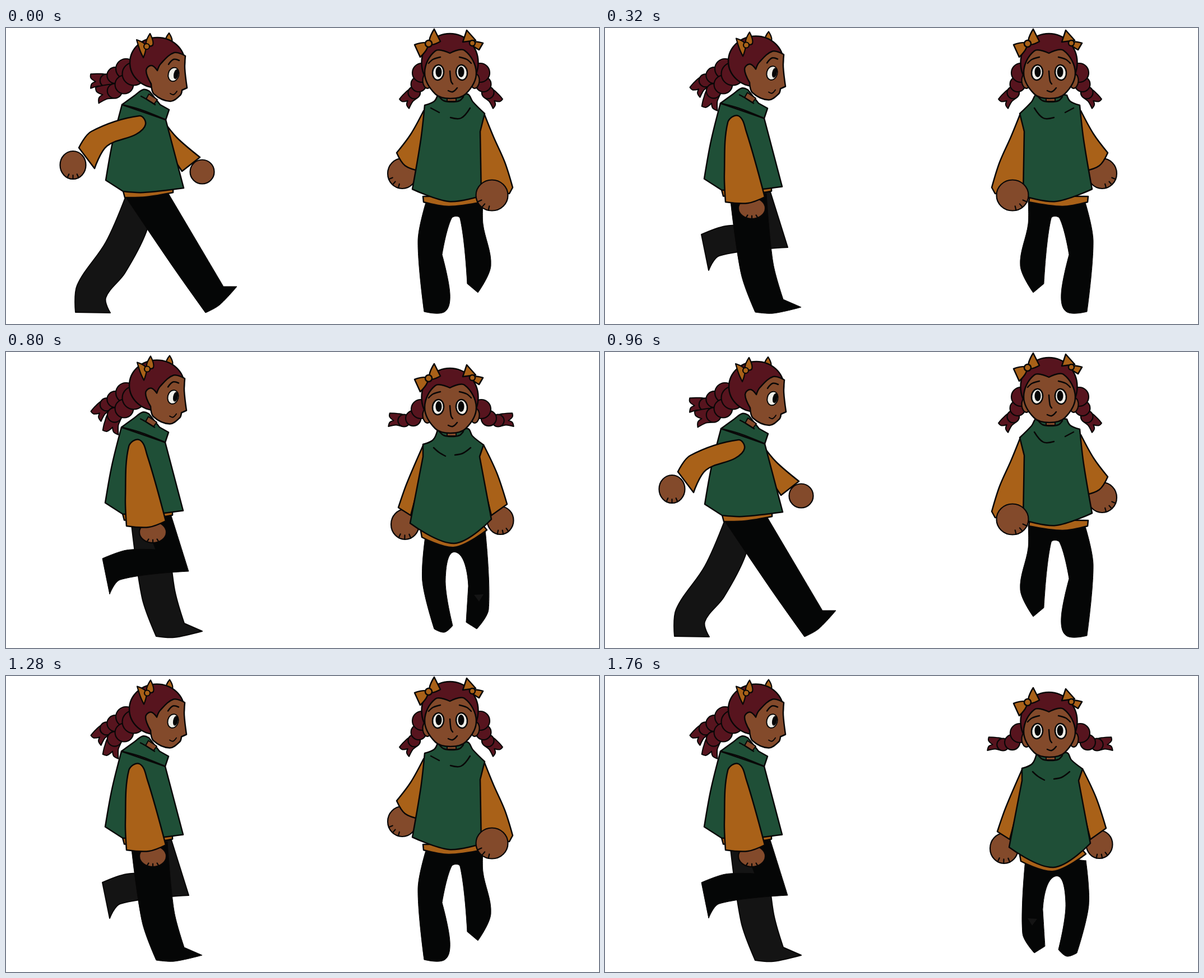
Animation, 1058 px wide and 529 px high, one loop 1.92 s. Source, as an HTML page with a canvas:

```html
<!DOCTYPE html>
<html lang="en">
<head>
<meta charset="utf-8">
<title>Walk cycle</title>
<style>
html, body { margin: 0; width: 100%; height: 100%; overflow: hidden; background: #fff; }
canvas { display: block; width: 100vw; height: 100vh; }
</style>
</head>
<body>
<canvas id="stage" width="1058" height="529"></canvas>
<script>
const ctx = document.getElementById('stage').getContext('2d');
const INK = '#080707', HAIR = '#57141e', SKIN = '#834a2b', GREEN = '#1f4f37',
      ORANGE = '#a96118', BLACK = '#050606', GREY = '#141414', EYE = '#efeee8';
const STEP = 160, STEPS = 12, DOWN = Math.PI / 2;
const cache = new Map();

// Smooth curve through "x,y" key points; a trailing "!" marks a sharp corner.
function trace(text, closed) {
  const key = text + closed;
  if (cache.has(key)) return cache.get(key);
  const pts = text.split(' ').map(s => {
    const [x, y] = s.replace('!', '').split(',').map(Number);
    return { x, y, sharp: s.endsWith('!') };
  });
  const n = pts.length;
  pts.forEach((p, i) => {
    const a = pts[(i + n - 1) % n], b = pts[(i + 1) % n];
    const still = p.sharp || (!closed && (i === 0 || i === n - 1));
    const d = still ? Infinity : Math.hypot(b.x - a.x, b.y - a.y);
    p.tx = (b.x - a.x) / d;
    p.ty = (b.y - a.y) / d;
  });
  const path = new Path2D();
  path.moveTo(pts[0].x, pts[0].y);
  for (let i = 0; i < (closed ? n : n - 1); i++) {
    const p = pts[i], q = pts[(i + 1) % n];
    const k = Math.hypot(q.x - p.x, q.y - p.y) / 3;
    path.bezierCurveTo(p.x + p.tx * k, p.y + p.ty * k, q.x - q.tx * k, q.y - q.ty * k, q.x, q.y);
  }
  if (closed) path.closePath();
  cache.set(key, path);
  return path;
}

function paint(path, fill, width = 2.5) {
  ctx.fillStyle = fill;
  ctx.fill(path);
  ctx.lineWidth = width;
  if (width) ctx.stroke(path);
}

const shape = (text, fill, width) => paint(trace(text, true), fill, width);

function line(text, width = 2.5) {
  ctx.lineWidth = width;
  ctx.stroke(trace(text, false));
}

function oval(x, y, rx, ry, fill, width, turn = 0) {
  const path = new Path2D();
  path.ellipse(x, y, rx, ry, turn, 0, Math.PI * 2);
  paint(path, fill, width);
}

function at(x, y, draw) {
  ctx.save();
  ctx.translate(x, y);
  draw();
  ctx.restore();
}

// Reflects x to sum - x when on.
function mirror(on, sum, draw) {
  ctx.save();
  if (on) ctx.transform(-1, 0, 0, 1, sum, 0);
  draw();
  ctx.restore();
}

// Round hand with three knuckle ticks fanned around an angle.
function fist(x, y, rx, ry, angle) {
  oval(x, y, rx, ry, SKIN, 2.2);
  if (angle === undefined) return;
  for (let a = angle - 0.45; a < angle + 0.5; a += 0.45) {
    const c = Math.cos(a), s = Math.sin(a);
    ctx.beginPath();
    ctx.moveTo(x + rx * c * 0.72, y + ry * s * 0.72);
    ctx.lineTo(x + rx * c, y + ry * s);
    ctx.stroke();
  }
}

// Shrinking beads along a curl, ending in a forked tuft.
function braid(x, y, r, angle, curl, tuft) {
  const beads = [];
  for (let i = 0; i < 3; i++) {
    beads.unshift([x, y, r]);
    x += Math.cos(angle) * r * 1.25;
    y += Math.sin(angle) * r * 1.25;
    angle += curl;
    r *= 0.8;
  }
  const [ex, ey, er] = beads[0];
  at(ex, ey, () => {
    ctx.rotate(tuft);
    ctx.scale(er / 10, er / 10);
    shape('0,-8 13,-8 25,-11! 23,-4 17,-1! 24,5 24,11! 12,11 0,8', HAIR, 20 / er);
  });
  beads.forEach(([bx, by, br]) => oval(bx, by, br, br, HAIR, 2.2));
}

// ---- side view ----

const legs = {
  contact: {
    back: '214,300! 178,383 127,460 124,508! 186,509! 178,482 212,438 250,365 262,305!',
    front: '212,300! 300,430 356,509! 381,495 412,462! 388,462! 290,296!'
  },
  down: {
    back: '213,318! 180,390 117,458! 162,509! 172,448 238,392 265,318!',
    front: '239,318! 300,405! 315,508! 398,509! 361,475! 346,367! 296,310!'
  },
  pass: {
    front: '223,300! 243,440 268,508! 300,510 350,499! 318,485! 300,420 288,296!',
    back: '245,296! 267,353! 215,354 172,369! 185,433! 204,407 326,392! 295,293!'
  }
};

function reachBack(down, near, dy) {
  const angle = near ? DOWN : undefined;
  if (down) fist(126, 271, 21.5, 22.5, angle);
  else fist(119.5, 245, 23, 25, angle);
  at(0, dy, () => shape('130,214! 152,185 238,157 249,172 232,190 180,211 158,251!', ORANGE));
}

function reachFront(down, near, dy) {
  const angle = near ? DOWN * 0.68 : undefined;
  if (down) fist(341, 281, 20, 20, angle);
  else fist(350, 257, 21.5, 21.5, angle);
  at(0, dy, () => shape(near
    ? '236,157 262,169 304,196 346,230! 312,257! 245,209 228,172'
    : '280,165! 305,196 346,231! 314,256! 290,220!', ORANGE));
}

function sideVest() {
  shape('208,288! 212,303! 250,302 298,294! 298,286!', ORANGE);
  shape('207,137! 285,164! 317,286! 245,294 209,292! 178,272! 190,205', GREEN);
  shape('207,137! 229,121 245,110 256,113! 275,137! 291,146! 285,164! 240,146', GREEN);
  shape('255,118! 270,128! 264,136! 250,127!', SKIN, 2);
  line('241,122 252,128 266,137');
}

function sideHead(shift) {
  at(shift, 0, () => shape('291,9! 296,25 285,23', ORANGE, 2.2));
  oval(270, 62, 49, 45, HAIR);
  shape('320,50! 300,44 276,64 270,76! 259,67 250,76 259,100! 264,118 293,131 311,120 314,111! 323,107! 319,72', SKIN);
  oval(299, 83, 9.5, 12.5, EYE, 2, 0.25);
  oval(303.5, 82.5, 4.3, 9, INK, 0, 0.2);
  line('290,65 299,56 309,58');
  line('293,117 299,119 305,113', 2);
  at(shift, 0, () => {
    shape('233,21! 249,31 245,53! 239,40', ORANGE, 2.2);
    shape('257,10! 262,30 250,29', ORANGE, 2.2);
    oval(251, 33, 5, 5, ORANGE, 2.2);
  });
}

function drawSide(i) {
  const kind = Object.keys(legs)[i % 3];
  const lead = i % 6 < 3;
  const down = kind === 'down', pass = kind === 'pass';
  const dx = pass ? -1 : 0;
  const dy = pass ? -2.5 : down ? 19.5 : 0;
  const { front, back } = legs[kind];

  shape(lead ? back : front, GREY, 2);
  shape(lead ? front : back, BLACK, 1);
  if (!pass) (lead ? reachFront : reachBack)(down, false, dy);
  at(dx, dy, sideVest);
  at(0, down ? 15 : 0, () => {
    braid(214, 73, 18, 2.6, 0, pass ? 2.3 : 3.1);
    braid(228, 82, 20.5, 2.3, 0.25, pass ? 1.8 : 2.9);
  });
  at(dx, dy, () => sideHead(pass ? 2 : 0));
  if (pass) {
    fist(262, 322, 24, 19, DOWN);
    shape('219,169 238,157 252,185 285,302! 255,313 215,311! 213,260', ORANGE);
  } else {
    (lead ? reachBack : reachFront)(down, true, dy);
  }
}

// ---- front view ----

function neck(y) {
  shape(`787,${y - 6}! 803,${y - 6}! 803,${y + 9}! 787,${y + 9}!`, SKIN, 2);
  line(`773,${y + 1} 781,${y + 8} 795,${y + 10} 809,${y + 8} 816,${y + 1}`);
}

function frontStride(flip) {
  mirror(flip, 1606, () => {
    shape('749,312! 735,380 746,507! 783,507 792,475 778,405! 795,340 810,340 823,457! 842,473! 865,425 851,350 851,310!', BLACK, 1);
    shape('744,301! 745,311! 790,319 850,311! 848,300!', ORANGE);
  });
  mirror(flip, 1594, () => {
    fist(707, 260, 26, 27, 2.3);
    shape('745,148! 722,190 697,223! 712,246 740,256! 752,170!', ORANGE);
    shape('853,153! 870,195 890,240 904,285! 898,296! 835,290! 835,185!', ORANGE);
    shape('747,138! 764,131 770,120! 823,118 833,132 854,153! 846,185! 848,300! 790,310 725,288! 740,200', GREEN);
    line('758,143 773,151');
    line('793,160 812,161 828,143');
    fist(867, 299, 28.5, 27.5, 2.25);
  });
  neck(122);
}

function frontPass(flip) {
  mirror(flip, 1606, () => {
    shape('748,330! 743,410 764,495! 782,501 797,489! 784,405 803,358 825,418! 821,483! 840,495! 861,460 855,318!', BLACK, 1);
    shape('835,434! 852,433! 844,446!', GREY, 0);
  });
  fist(712, 308, 25, 27, 1.6);
  fist(882, 301, 23.5, 25, 1.35);
  shape('745,165! 715,235 700,278! 722,292! 750,186!', ORANGE);
  shape('852,166! 876,217 894,272! 866,292! 840,187!', ORANGE);
  shape('740,320! 742,331! 800,349 858,318! 853,312!', ORANGE);
  shape('744,165! 762,157 770,139! 824,137 832,150 852,166! 845,187! 866,299! 800,342 721,306! 744,187!', GREEN);
  line('763,171 772,179 784,186');
  line('801,184 815,181 829,171');
  neck(141);
}

function frontHead() {
  oval(792, 62, 50.5, 52, HAIR);
  for (const right of [false, true]) {
    mirror(right, 1588, () => oval(751, 95, 7.5, 13, SKIN, 2.2, -0.1));
  }
  shape('792,45! 766,41 747,80 766,118 793,126 820,118 839,80 818,40', SKIN);
  for (const right of [false, true]) {
    mirror(right, 1584, () => {
      oval(771, 79.5, 10, 13.5, EYE, 2.5, 0.1);
      oval(772, 78.5, 5.5, 9.5, INK, 0);
      line('754,63 762,56 775,52');
    });
  }
  line('792,77 794,95 797,100');
  line('789,112 797,114 805,107');
  shape('764,2! 775,24! 756,28', ORANGE);
  shape('729,30! 752,29 739,52!', ORANGE);
  oval(754, 28, 6, 6, ORANGE);
  shape('822,4! 838,22! 815,25!', ORANGE);
  shape('832,27 851,27! 844,39!', ORANGE);
  oval(832, 27, 5, 5, ORANGE);
}

function drawFront(i) {
  const pass = i % 2 === 1;
  (pass ? frontPass : frontStride)(i % 4 > 1);
  at(0, pass ? 19 : 0, () => {
    for (const right of [false, true]) {
      mirror(right, 1588, () => pass
        ? braid(740, 83, 17, 2.25, 0.65, 3.2)
        : braid(742, 80, 17, 1.85, 0.2, 2.3));
    }
    frontHead();
  });
}

function render(now) {
  const i = Math.floor(now / STEP) % STEPS;
  ctx.fillStyle = '#fff';
  ctx.fillRect(0, 0, 1058, 529);
  ctx.strokeStyle = INK;
  ctx.lineJoin = ctx.lineCap = 'round';
  drawSide(i);
  drawFront(i);
}

const start = performance.now();
function tick() {
  render(performance.now() - start);
  requestAnimationFrame(tick);
}
tick();
</script>
</body>
</html>
```
